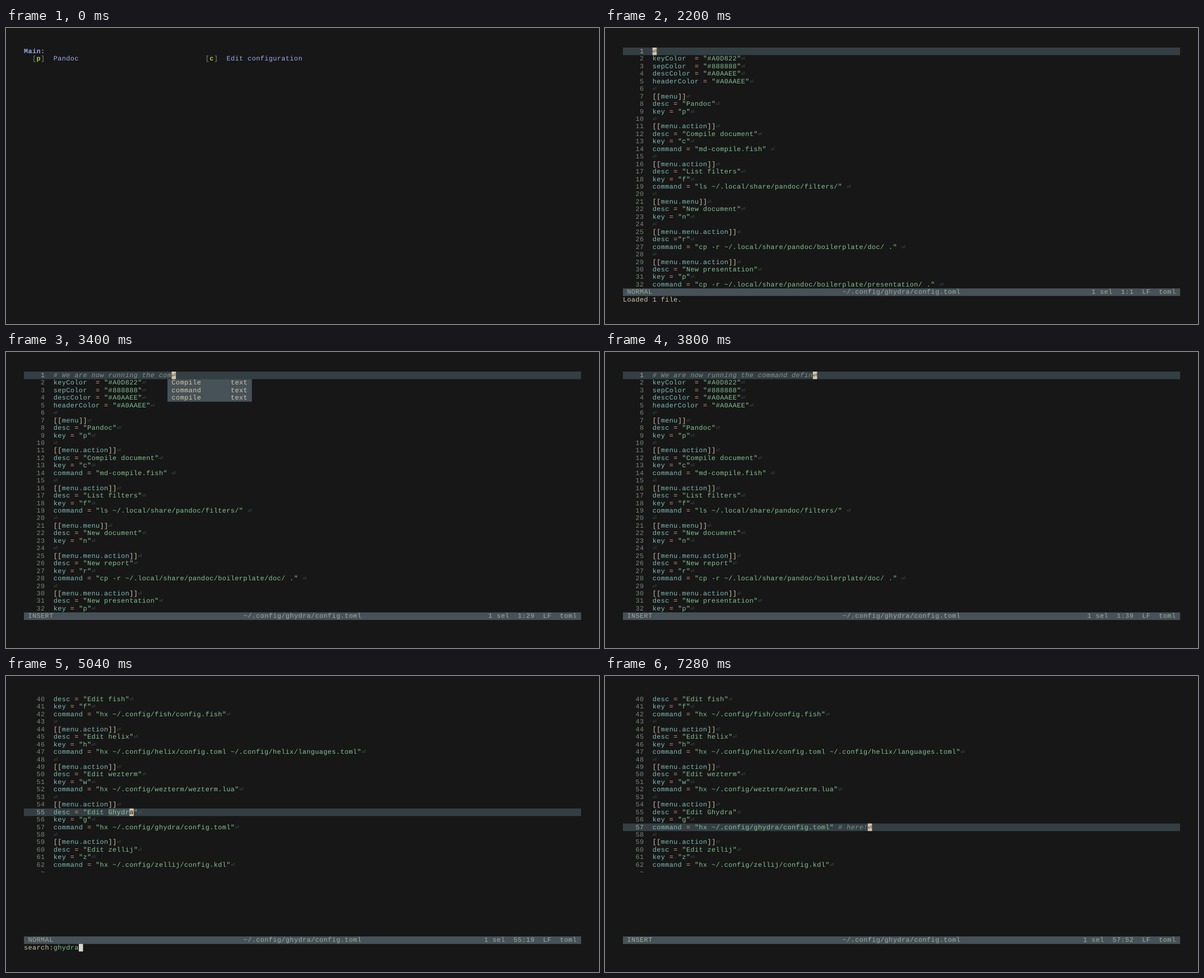
An HTML page for the animation above (9600 ms loop, 1058x529 px).

```html
<!DOCTYPE html>
<html lang="en">
<head>
<meta charset="utf-8">
<title>Terminal menu</title>
<style>
  html, body { margin: 0; width: 100%; height: 100%; overflow: hidden; background: #171717; }
  svg { display: block; width: 100vw; height: 100vh; }
  text { white-space: pre; font-family: "Liberation Mono", "DejaVu Sans Mono", monospace; text-rendering: geometricPrecision; }
</style>
</head>
<body>
<svg id="screen" viewBox="0 0 1058 529"></svg>
<script>
const LOOP = 9600, TICK = 40;
const X0 = 32, Y0 = 35, CW = 7.531, RH = 13.45, FS = 11.84;
const COLS = 132, ROWS = 32, GUTTER = 7;
const SPACING = CW - FS * 1229 / 2048;
const C = {
  bg: "#171717", fg: "#d3c6aa", line: "#343f44", bar: "#475258", barText: "#9da9a0",
  num: "#7a8478", numOn: "#9da9a0", key: "#7fbbb3", str: "#83c092", op: "#e69875",
  dot: "#859289", note: "#859289", eol: "#4f585e", prompt: "#dcd7c9",
  menu: "#A0AAEE", hot: "#A0D822", sep: "#888888"
};

const screen = document.getElementById("screen");
screen.setAttribute("font-size", FS);
screen.setAttribute("letter-spacing", SPACING.toFixed(3));

const px = (col) => (X0 + col * CW).toFixed(2);
const box = (col, row, w, h, fill) =>
  `<rect x="${px(col)}" y="${(Y0 + row * RH).toFixed(2)}" width="${(w * CW).toFixed(2)}" height="${(h * RH).toFixed(2)}" fill="${fill}"/>`;
const put = (col, row, s, fill, attrs = "") =>
  `<text x="${px(col)}" y="${(Y0 + row * RH + 9.9).toFixed(2)}" fill="${fill}" ${attrs}>${s}</text>`;

// Config file shown in the editor
const block = (path, desc, key, command) => [
  `[[${path}]]`, `desc = "${desc}"`, `key = "${key}"`,
  ...(command ? [`command = ${command}`] : []), ""
];
const edit = (name, key, files) => block("menu.action", `Edit ${name}`, key, `"hx ${files}"`);
const copy = (name, key, dir) =>
  block("menu.menu.action", `New ${name}`, key, `"cp -r ~/.local/share/pandoc/boilerplate/${dir}/ ." `);

const file = [
  "", 'keyColor  = "#A0D822"', 'sepColor  = "#888888"', 'descColor = "#A0AAEE"', 'headerColor = "#A0AAEE"', "",
  ...block("menu", "Pandoc", "p"),
  ...block("menu.action", "Compile document", "c", '"md-compile.fish" '),
  ...block("menu.action", "List filters", "f", '"ls ~/.local/share/pandoc/filters/" '),
  ...block("menu.menu", "New document", "n"),
  ...copy("report", "r", "doc"),
  ...copy("presentation", "p", "presentation"),
  ...block("menu", "Edit configuration", "c"),
  ...edit("fish", "f", "~/.config/fish/config.fish"),
  ...edit("helix", "h", "~/.config/helix/config.toml ~/.config/helix/languages.toml"),
  ...edit("wezterm", "w", "~/.config/wezterm/wezterm.lua"),
  ...edit("Ghydra", "g", "~/.config/ghydra/config.toml"),
  ...edit("zellij", "z", "~/.config/zellij/config.kdl")
].slice(0, -1);
const draft = [...file];
draft.splice(25, 2, 'desc ="r"');

const COMMENT = "# We are now running the command defined ...";
const QUERY = "ghydra/config.toml";
const SUFFIX = " # here!";

// Key menu
function menu(title, items) {
  return put(0, 0, title + ":", C.menu, 'font-weight="bold"') + items.map(([key, desc], i) => {
    const col = 2 + 41 * (i % 3), row = 1 + Math.floor(i / 3);
    return put(col, row, "[", C.sep) + put(col + 1, row, key, C.hot, 'font-weight="bold"') +
      put(col + 2, row, "]", C.sep) + put(col + 5, row, desc, C.menu);
  }).join("");
}

function tokenColor(s) {
  if (s[0] === '"') return C.str;
  if (s[0] === "#") return C.note;
  if (s === "=") return C.op;
  if (s === ".") return C.dot;
  if (s === "⏎") return C.eol;
  return /\w/.test(s) ? C.key : C.fg;
}

function codeLine(s, row) {
  const tokens = (s + "⏎").matchAll(/"[^"]*"|#[^⏎]*|\w+|\[\[|\]\]|[=.⏎]/g);
  return [...tokens].map((m) =>
    put(GUTTER + m.index, row, m[0], tokenColor(m[0]), m[0][0] === "#" ? 'font-style="italic"' : "")
  ).join("");
}

function popup(col, items) {
  return box(col, 1, 20, items.length, C.bar) + items.map((s, i) =>
    put(col + 1, i + 1, s, C.fg) + put(col + 15, i + 1, "text", C.fg)).join("");
}

// line and col count from 1; sel is the length of the selection
function editor({ lines, mode = "NORMAL", top = 1, line = 1, col = 1, sel = 1, list, foot = "" }) {
  const row = line - top, at = GUTTER + col - 1;
  let out = box(0, row, COLS, 1, C.line);
  if (sel > 1) out += box(at - sel + 1, row, sel - 1, 1, C.bar);
  for (let r = 0; r < ROWS; r++) {
    const n = top + r;
    if (n > lines.length) {
      out += put(4, r, "~", C.num);
      break;
    }
    out += put(5 - String(n).length, r, n, n === line ? C.numOn : C.num) + codeLine(lines[n - 1], r);
  }
  if (list) out += popup(34, list);
  out += box(at, row, 1, 1, C.fg) + put(at, row, (lines[line - 1] + "⏎")[col - 1], C.bg);
  const info = `1 sel  ${line}:${col}  LF  toml`;
  return out + box(0, ROWS, COLS, 1, C.bar) + put(1, ROWS, mode, C.barText) +
    put(52, ROWS, "~/.config/ghydra/config.toml", C.barText) +
    put(COLS - 1 - info.length, ROWS, info, C.barText) + foot;
}

const footer = (s) => put(0, ROWS + 1, s, C.fg);

const withLine = (lines, n, s) => lines.map((old, i) => (i === n - 1 ? s : old));

function suggestions(n) {
  if (n === 27) return ["Compile", "command", "config", "configuration", "compile"];
  if (n === 28) return ["Compile", "command", "compile"];
  return n > 28 && n < 33 ? ["command"] : null;
}

// Where incremental search lands for the first n letters of the query
function find(n) {
  if (n === 0) return { line: 1, col: COMMENT.length + 1 };
  if (n === 1) return { top: 21, line: 36, col: 19 };
  if (n <= 6) return { top: 40, line: 55, col: 13 + n, sel: n };
  return { top: 40, line: 57, col: 24 + n, sel: n };
}

function render(t) {
  if (t < 840) return menu("Main", [["p", "Pandoc"], ["c", "Edit configuration"]]);
  if (t < 1680) return menu("Edit configuration", [["f", "Edit fish"], ["h", "Edit helix"],
    ["w", "Edit wezterm"], ["g", "Edit Ghydra"], ["z", "Edit zellij"]]);
  if (t < 1720) return "";
  if (t < 2240) return editor({ lines: draft, foot: t < 1760 ? "" : footer("Loaded 1 file.") });

  const typed = Math.max(0, Math.min(COMMENT.length, (t - 2280) / TICK));
  let lines = withLine(file, 1, COMMENT.slice(0, typed));
  if (t < 4800) {
    return editor({ lines, mode: t < 4200 ? "INSERT" : "NORMAL", col: typed + 1, list: suggestions(typed) });
  }
  if (t < 6240) {
    const n = Math.min(QUERY.length, (t - 4800) / TICK);
    let foot = "";
    if (t < 5560) {
      foot = footer("search:") + put(7, ROWS + 1, QUERY.slice(0, n), C.str);
      if (n) foot += box(7 + n, ROWS + 1, 1, 1, C.prompt);
    }
    return editor({ lines, ...find(n), foot });
  }
  const added = t < 7040 ? 0 : Math.min(SUFFIX.length, 2 + (t - 7040) / TICK);
  lines = withLine(lines, 57, lines[56] + SUFFIX.slice(0, added));
  return editor({ lines, mode: "INSERT", top: 40, line: 57, col: 44 + added });
}

let shown = -1;
function frame() {
  const t = Math.floor((performance.now() % LOOP) / TICK) * TICK;
  if (t !== shown) {
    shown = t;
    screen.innerHTML = render(t);
  }
  requestAnimationFrame(frame);
}
frame();
</script>
</body>
</html>
```
